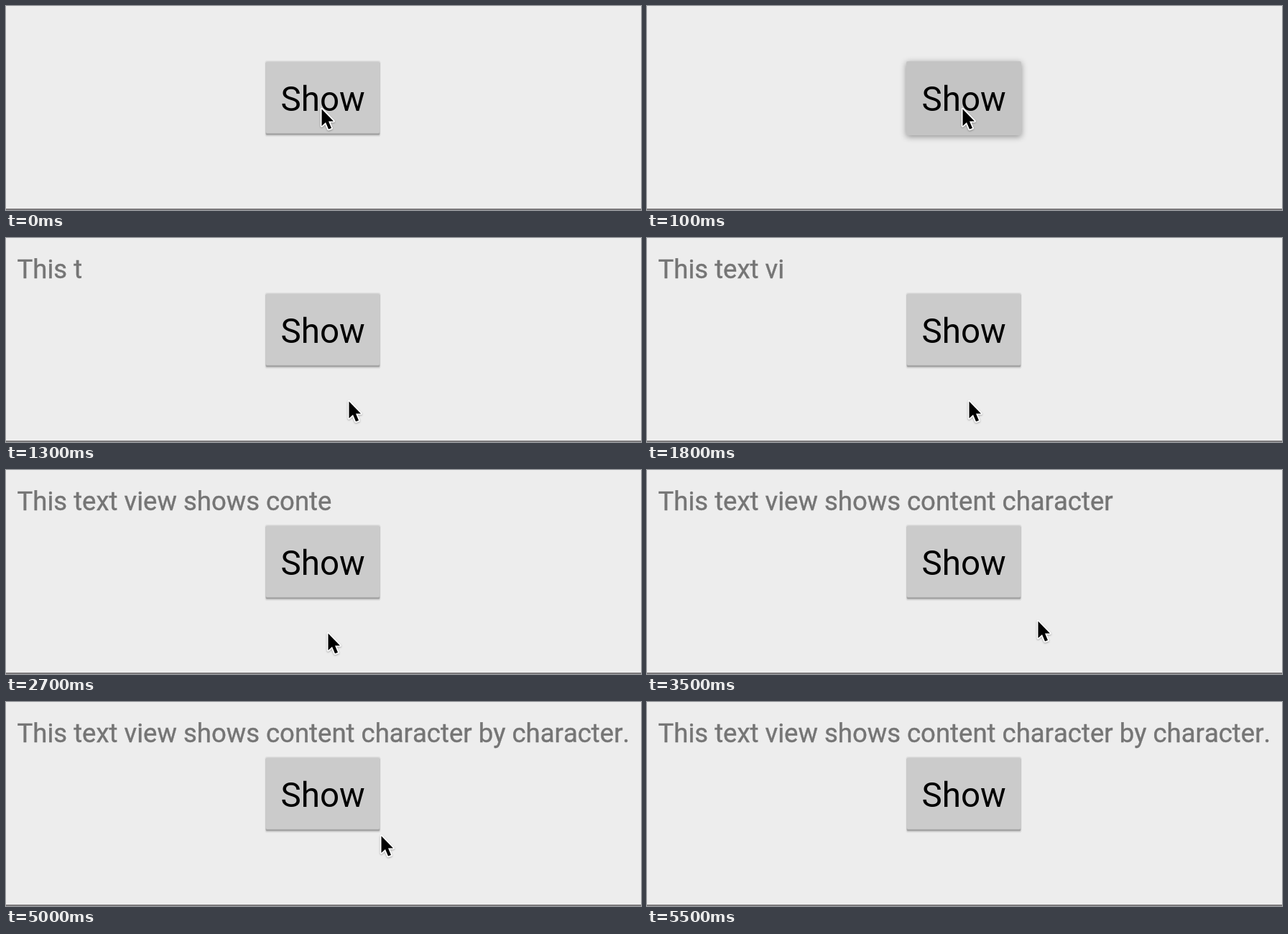
An HTML page for the animation above (5.8 s loop, 884 px wide and 284 px high).

```html
<!DOCTYPE html>
<html lang="en">
<head>
<meta charset="utf-8">
<title>Typed text</title>
<style>
  html, body { margin: 0; width: 100%; height: 100%; overflow: hidden; background: #ededed; }
  svg { display: block; }
  text { font-family: Roboto, sans-serif; font-kerning: none; white-space: pre; }
  #typed { fill: #757575; stroke: #757575; stroke-width: .4px; }
  #pressed { filter: drop-shadow(0 2px 4px rgba(0, 0, 0, .4)); }
  #cursor { filter: drop-shadow(0 1px 1px rgba(0, 0, 0, .3)); }
</style>
</head>
<body>
<svg width="884" height="284" viewBox="0 0 884 284">
  <rect y="282" width="884" height="2" fill="#7b797b"/>
  <text id="typed" x="15.5" y="56" font-size="36.5"></text>

  <rect id="pressed" x="361" y="77" width="160" height="103" rx="2" fill="#c4c4c4"/>
  <g id="button">
    <rect x="360.5" y="76" width="161" height="106" rx="3" fill="#dedede"/>
    <rect x="361.5" y="78" width="159" height="102" rx="2" fill="#a9a9a9"/>
    <rect x="361.5" y="77.5" width="159" height="99.5" rx="2" fill="#cbcbcb"/>
  </g>
  <text x="441.2" y="146.3" font-size="47.5" text-anchor="middle">Show</text>

  <g id="cursor">
    <path d="M1.5 3.5V27L7 22L11 31.5L15 30L11 20.5H18Z"
          stroke="#fff" stroke-width="3.6" stroke-linejoin="round" paint-order="stroke"/>
  </g>
</svg>
<script>
  const LOOP = 5800, STEP = 100;
  const MESSAGE = 'This text view shows content character by character.';

  // Typing bursts: [from ms, to ms, characters]
  const bursts = [[800, 1800, 12.5], [1800, 2700, 14.4], [2700, 4200, 21.05], [4300, 4800, 4.06]];

  // Pointer moves: [from ms, to ms, dx, dy]
  const moves = [
    [200, 600, 0, 7], [600, 1000, 45, 77], [1100, 1800, -36, 0],
    [3300, 3500, 96, -17], [3600, 4200, -11, -20], [4900, 5400, -101, -37]
  ];

  const el = id => document.getElementById(id);
  const show = (id, on) => el(id).setAttribute('visibility', on ? 'visible' : 'hidden');
  const progress = (t, from, to) => Math.min(1, Math.max(0, (t - from) / (to - from)));
  const smooth = p => p * p * (3 - 2 * p);

  function draw(now) {
    const t = Math.floor((now % LOOP) / STEP) * STEP;

    let count = 0;
    for (const [from, to, chars] of bursts) count += chars * progress(t, from, to);
    el('typed').textContent = MESSAGE.slice(0, Math.floor(count));

    let x = 438, y = 140;
    for (const [from, to, dx, dy] of moves) {
      const p = smooth(progress(t, from, to));
      x += dx * p;
      y += dy * p;
    }
    el('cursor').setAttribute('transform', `translate(${Math.round(x)} ${Math.round(y)})`);
    show('cursor', t < 5500);

    const pressed = t === 100;
    show('pressed', pressed);
    show('button', !pressed);
  }

  let start;
  function tick(now) {
    start ??= now;
    draw(now - start);
    requestAnimationFrame(tick);
  }
  draw(0);
  requestAnimationFrame(tick);
</script>
</body>
</html>
```
